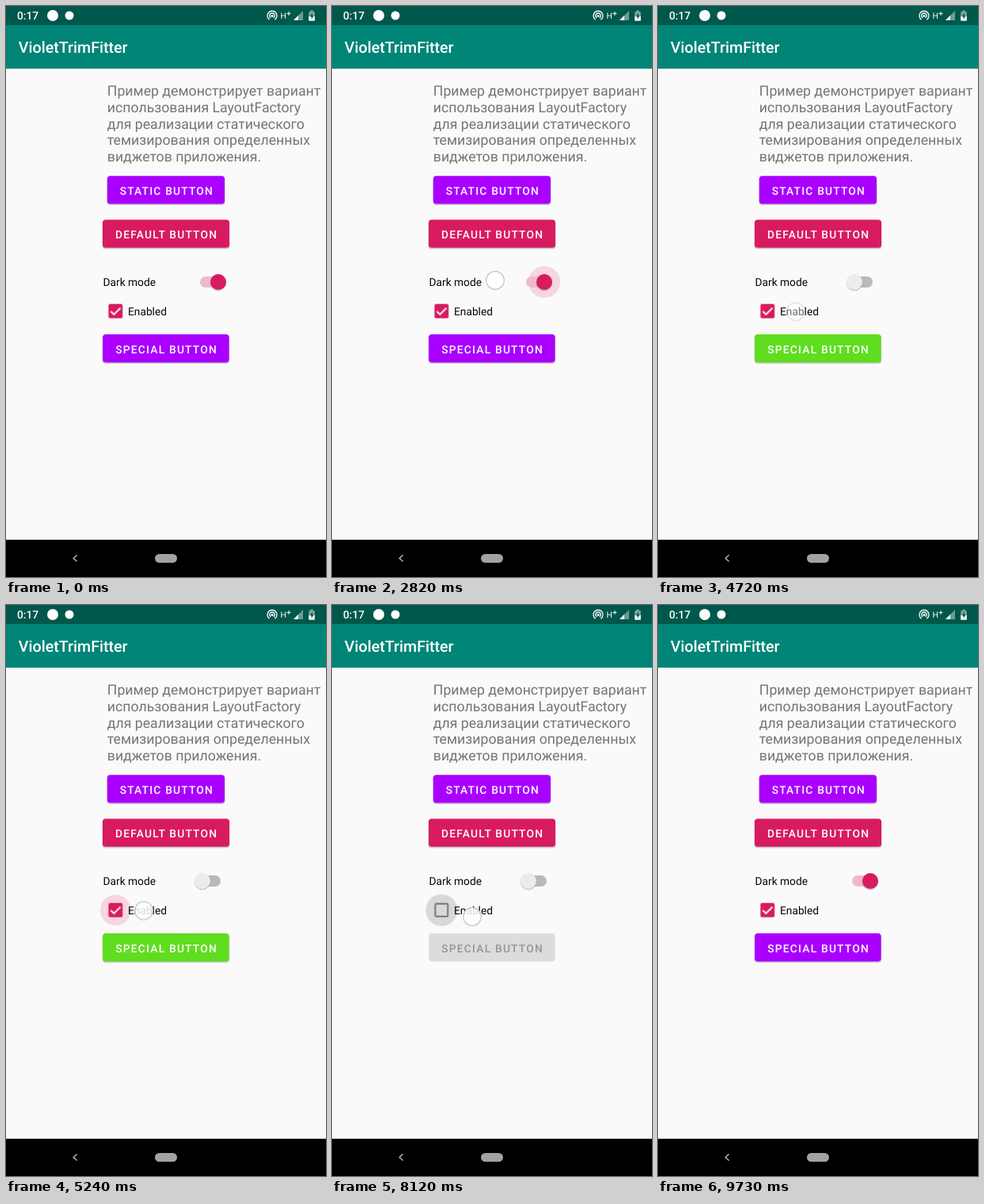
These frames come from a looping animation (404x720 px, 9790 ms). An HTML page:

```html
<!DOCTYPE html>
<html lang="ru">
<head>
<meta charset="utf-8">
<title>Theme demo</title>
<style>
  html, body { margin: 0; width: 100%; height: 100%; overflow: hidden; background: #fafafa; }
  svg { display: block; width: 100%; height: 100%; font-family: Roboto, sans-serif; text-rendering: geometricPrecision; }
  .title { font-size: 19.66px; font-weight: 500; fill: #fff; }
  .para { font-size: 17.7px; fill: #757575; }
  .label { font-size: 13.76px; fill: #060606; }
  .btn { font-size: 13.76px; font-weight: 500; letter-spacing: 1.23px; fill: #fff; }
  .shade { fill: #808080; opacity: .4; }
</style>
</head>
<body>
<svg viewBox="0 0 404 720" xmlns="http://www.w3.org/2000/svg">
  <rect width="404" height="720" fill="#fafafa"/>
  <rect width="404" height="79" fill="#008577"/>
  <rect width="404" height="24" fill="#00574b"/>

  <!-- status bar -->
  <g fill="#fff">
    <text x="14" y="17" font-size="13.8" font-weight="500">0:17</text>
    <circle cx="59" cy="12" r="7"/>
    <circle cx="80" cy="12" r="5.5"/>
    <g fill="none" stroke="#f4f8f6" stroke-width="1.4">
      <path d="M332.6 17.2A6 6 0 1 1 339.4 17.2M334.2 14.8A3.2 3.2 0 1 1 337.8 14.8"/>
    </g>
    <circle cx="336" cy="12.4" r="1.5"/>
    <text x="346.5" y="16" font-size="10.5">H</text>
    <path d="M354.5 9.5h5M357 7v5" stroke="#fff"/>
    <path d="M375 6V18H363Z" fill="#6b9c94"/>
    <path d="M369 12V18H363Z"/>
    <path d="M382.3 7.2h2V5.6h3.4v1.6h2V18.6h-7.4Z" fill="#7ea59f"/>
    <path d="M382.3 12.8h7.4v5.8h-7.4Z"/>
    <path d="M386.8 8.5l-3.2 5h2v3.6l3-5h-1.8Z" fill="#00574b"/>
  </g>
  <text class="title" x="15.7" y="58.5">VioletTrimFitter</text>

  <g class="para" id="para"></g>

  <g id="staticBtn">
    <rect class="shade" x="127.5" y="215" width="149" height="36" rx="4"/>
    <rect x="127.8" y="214.2" width="148.2" height="35.3" rx="3.8" fill="#aa00ff"/>
    <text class="btn" x="143.7" y="237.6">STATIC BUTTON</text>
  </g>
  <g id="defaultBtn">
    <rect class="shade" x="121.5" y="270.5" width="161" height="36" rx="4"/>
    <rect x="122" y="269.4" width="160" height="35.3" rx="3.8" fill="#d81b60"/>
    <text class="btn" x="138" y="292.7">DEFAULT BUTTON</text>
  </g>

  <!-- dark mode switch -->
  <text class="label" x="122.5" y="353">Dark mode</text>
  <g transform="translate(248 348)">
    <g id="haloPos"><circle id="halo" r="20"/></g>
    <rect id="track" x="-3" y="-7" width="26" height="14" rx="7"/>
    <g id="thumbPos">
      <circle cy="1" r="10.3" fill="#707070" opacity=".35"/>
      <circle id="thumb" r="10"/>
    </g>
  </g>

  <!-- check box -->
  <g transform="translate(138.3 384.7)">
    <circle id="boxHalo" r="20"/>
    <rect id="boxOff" x="-7.9" y="-7.9" width="15.8" height="15.8" rx="1.2" fill="none" stroke="#757575" stroke-width="2"/>
    <g id="boxOn">
      <rect x="-8.9" y="-8.9" width="17.8" height="17.8" rx="2" fill="#d81b60"/>
      <path d="M-6 .2L-2 4.2L6.2-4" fill="none" stroke="#fafafa" stroke-width="2"/>
    </g>
  </g>
  <text class="label" x="154" y="390">Enabled</text>

  <g id="specialBtn">
    <rect class="shade" id="specialShade" x="121.7" y="415" width="160.5" height="36" rx="4"/>
    <rect id="special" x="122.1" y="414.1" width="159.5" height="35.3" rx="3.8"/>
    <text class="btn" id="specialText" x="138.3" y="437.5">SPECIAL BUTTON</text>
  </g>

  <!-- navigation bar -->
  <rect y="673" width="404" height="47" fill="#000"/>
  <path d="M89.6 692.2L85.2 696.4L89.6 700.6" fill="none" stroke="#b8b8b8" stroke-width="1.4"/>
  <rect x="188" y="691" width="28" height="11" rx="5.5" fill="#a3a3a3"/>

  <g id="touch">
    <circle r="11.3" fill="#fff" fill-opacity=".85" stroke="#c0c2c4" stroke-width="1.2"/>
  </g>
</svg>
<script>
const LOOP = 9790;
const $ = id => document.getElementById(id);

const lines = ['Пример демонстрирует вариант', 'использования LayoutFactory',
  'для реализации статического', 'темизирования определенных', 'виджетов приложения.'];
$('para').innerHTML = lines
  .map((s, i) => `<text x="127.8" y="${113.3 + i * 20.6}">${s}</text>`).join('');

// steps: [ms, value, easing to the next]; two entries at one time make a hard change
function play(id, prop, steps) {
  const first = steps[0], last = steps[steps.length - 1];
  const all = [[0, first[1]], ...steps, [LOOP, last[1]]];
  const frames = all.map(([t, v, easing = 'linear']) => ({ offset: t / LOOP, [prop]: v, easing }));
  $(id).animate(frames, { duration: LOOP, iterations: Infinity });
}

// values that hold until the next time: v0, t1, v1, t2, v2 ...
function hold(id, prop, v, ...rest) {
  const steps = [];
  for (let i = 0; i < rest.length; i += 2) {
    steps.push([rest[i], v], [rest[i], rest[i + 1]]);
    v = rest[i + 1];
  }
  play(id, prop, steps);
}

// ripples: [press, grown, release, gone]
function ripple(id, presses) {
  play(id, 'opacity', presses.flatMap(([a, b, c, d]) =>
    [[a, 0], [a + 160, 1], [c, 1], [d, c === d ? 1 : 0], [d, 0]]));
  play(id, 'transform', presses.flatMap(([a, b, c, d]) =>
    [[a, 'scale(.35)', 'ease-out'], [b, 'scale(1)'], [d, 'scale(1)'], [d, 'scale(.35)']]));
}

const at = (x, y) => `translate(${x}px, ${y}px)`;
const RED = '#d81b60', LIGHT = '#ececec', PURPLE = '#aa00ff', GREEN = '#5fdd1e';
const ON = '#f0b9cb', OFF = '#b9b9b9', PINK = '#f6d6e0', GREY = '#d8d8d8';
const themeOff = 3050, uncheck = 5990, check = 8200, themeOn = 9730;

// switch
for (const id of ['haloPos', 'thumbPos'])
  play(id, 'transform', [[themeOff, at(20, 0)], [themeOff, at(0, 0)],
    [9480, at(0, 0), 'ease-in-out'], [themeOn, at(20, 0)]]);
play('thumb', 'fill', [[themeOff, RED], [themeOff, LIGHT], [9500, LIGHT], [themeOn, RED]]);
play('track', 'fill', [[themeOff, ON], [themeOff, OFF], [9440, OFF], [9500, '#d4a0b0'], [themeOn, ON]]);
hold('halo', 'fill', PINK, themeOff, GREY, themeOn, PINK);
ripple('halo', [[2300, 2820, themeOff, themeOff], [8860, 9210, themeOn, themeOn]]);

// check box
play('boxOn', 'opacity', [[uncheck, 1], [uncheck + 300, 0], [check, 0], [check + 300, 1]]);
play('boxOff', 'opacity', [[uncheck, 0], [uncheck + 150, 1], [check + 150, 1], [check + 300, 0]]);
play('boxHalo', 'fill', [[uncheck, PINK], [uncheck + 200, GREY], [check, GREY], [check + 200, PINK]]);
ripple('boxHalo', [[4720, 5350, uncheck, 6450], [6680, 7190, check, 8690]]);

// special button
hold('special', 'fill', PURPLE, themeOff, GREEN, uncheck, '#dcdcdc', check, GREEN, themeOn, PURPLE);
hold('specialText', 'fill', '#fff', uncheck, '#959595', check, '#fff');
hold('specialShade', 'opacity', .4, uncheck, 0, check, .4);

// finger
play('touch', 'transform', [
  [3110, at(206, 346)], [3110, at(174, 385.5)], [6450, at(174, 385.5)],
  [6450, at(175, 387)], [7770, at(175, 387)], [8100, at(177, 393)],
  [8690, at(177, 393)], [8690, at(200.5, 348)], [9600, at(200.5, 348)], [9600, at(206, 346)]]);
const presses = [[2300, themeOff], [4720, uncheck], [6680, check], [8860, 9550]];
play('touch', 'opacity', presses.flatMap(([a, b]) =>
  [[a, 0], [a, .5], [a + 160, 1], [b, 1], [b, 0]]));
</script>
</body>
</html>
```
